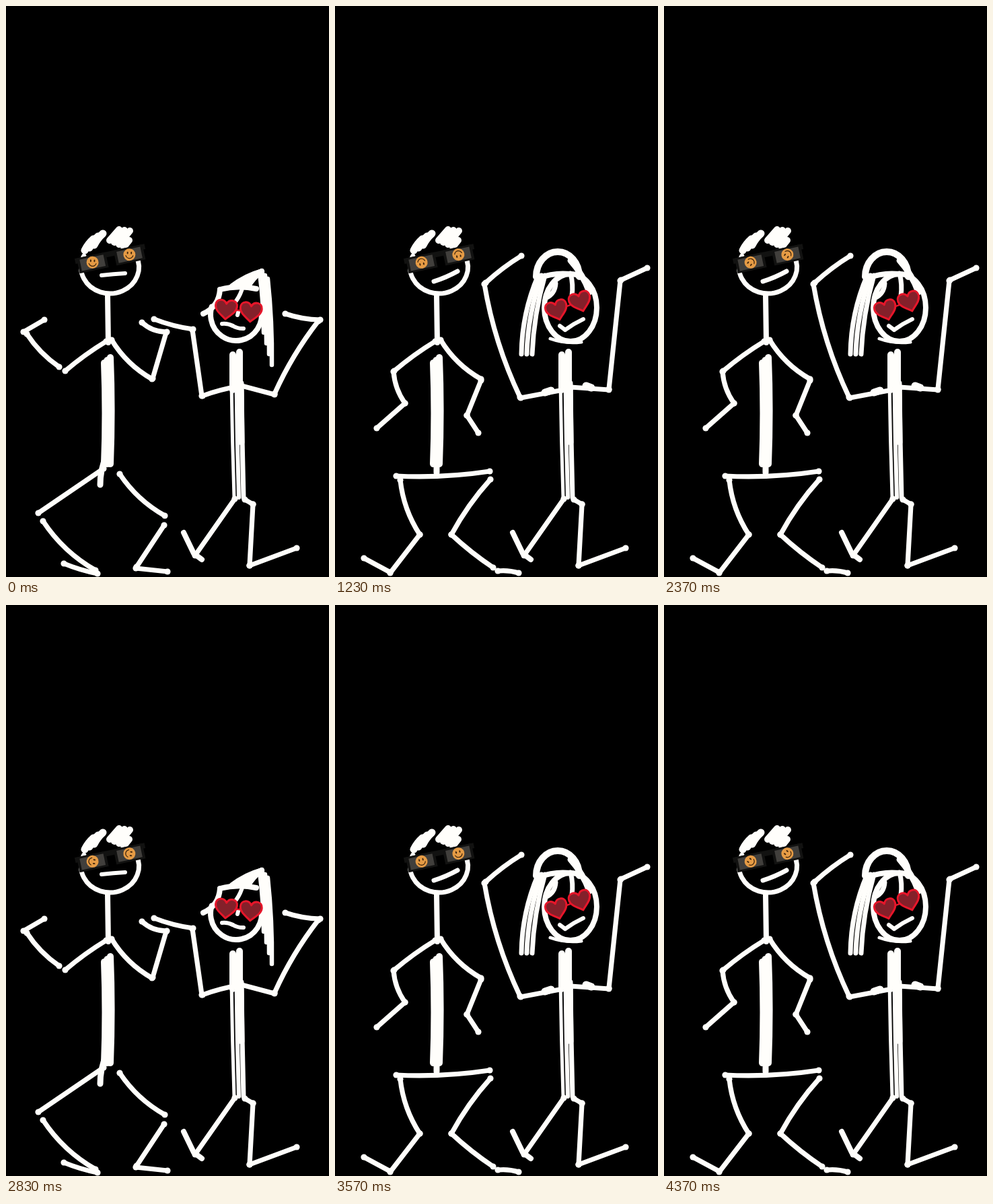
These frames come from a looping animation (480x848 px, 4410 ms). An HTML page with a canvas:

```html
<!DOCTYPE html>
<html>
<head>
<meta charset="utf-8">
<style>
  html, body { margin: 0; width: 100%; height: 100%; overflow: hidden; background: #000; }
  canvas { display: block; width: 480px; height: 848px; }
</style>
</head>
<body>
<canvas id="stage" width="480" height="848"></canvas>
<script>
const ctx = document.getElementById('stage').getContext('2d');
const LOOP = 4410, BEAT = 630, TURNS = 16;
const CHALK = '#fffefb', RED = '#e6162a', INK = '#38200a';

function disc(x, y, rx, ry = rx) {
  ctx.beginPath();
  ctx.ellipse(x, y, rx, ry, 0, 0, 7);
  ctx.fill();
}

// Chalk line through the points; every segment bows sideways by the share `bend`.
function line(width, bend, ...pts) {
  ctx.lineWidth = width;
  ctx.beginPath();
  ctx.moveTo(...pts[0]);
  for (let i = 1; i < pts.length; i++) {
    const [ax, ay] = pts[i - 1], [bx, by] = pts[i];
    ctx.quadraticCurveTo((ax + bx) / 2 - (by - ay) * bend,
      (ay + by) / 2 + (bx - ax) * bend, bx, by);
  }
  ctx.stroke();
}

// The brush presses harder at both ends of a limb.
function limb(bend, from, to) {
  line(7.2, bend, from, to);
  for (const end of [from, to]) disc(...end, 4.6);
}

function arc(width, x, y, rx, ry, from, to) {
  ctx.lineWidth = width;
  ctx.beginPath();
  ctx.ellipse(x, y, rx, ry, 0, from, to);
  ctx.stroke();
}

function repeat(count, draw) {
  for (let i = 0; i < count; i++) draw(i);
}

function at(x, y, angle, draw) {
  ctx.save();
  ctx.translate(x, y);
  ctx.rotate(angle);
  draw();
  ctx.restore();
}

function manBody() {
  arc(7, 154.5, 388, 43, 39, -0.45, Math.PI + 0.45);
  repeat(3, i => {
    line(11, -0.1, [117 + 7 * i, 363 - 4 * i], [130 + 7 * i, 346 - 4 * i]);
    line(10, 0, [154 + 7 * i, 348 + 3 * i], [168 + 8 * i, 332 + i]);
  });
  line(10, 0, [175, 358], [183, 348]);
  line(8, 0, [151, 430], [152, 500]);
  limb(0.04, [149, 498], [88, 542]);
  limb(0.13, [157, 496], [217, 554]);
  repeat(3, i => line(10, -0.02, [146 + 4.5 * i, 530 - 4 * i], [146 + 4.5 * i, 680]));
}

function womanBody() {
  repeat(2, i => line(10, 0, [337 + 10 * i, 518 - 4 * i], [337 + 10 * i, 570]));
  repeat(3, i => line(5 + i, 0.005, [335 + 7.5 * i, 560], [339 + 7 * i, 730]));
  line(9, 0, [349, 570], [350, 648]);
  limb(0, [340, 732], [281, 816]);
  line(8, 0, [264, 782], [279, 813], [291, 822]);
  limb(0, [355, 733], [367, 740]);
  limb(0, [367, 740], [362, 831]);
  limb(0, [362, 831], [432, 805]);
}

function crouch() {
  line(6, -0.02, [142, 400], [177, 397]);
  limb(-0.1, [79, 536], [31, 487]);
  limb(0, [26, 484], [57, 466]);
  limb(0, [218, 553], [238, 485]);
  limb(0.2, [202, 470], [239, 484]);
  line(9, 0.05, [156, 650], [142, 690], [140, 711]);
  limb(0, [145, 687], [48, 753]);
  limb(0.12, [55, 765], [133, 838]);
  limb(0.05, [86, 828], [136, 843]);
  limb(0.12, [169, 695], [236, 757]);
  limb(0, [235, 771], [194, 833]);
  limb(0, [193, 835], [240, 840]);
}

function squat() {
  line(7, 0.05, [147, 409], [182, 394]);
  limb(0.14, [87, 543], [104, 590]);
  limb(0, [104, 590], [62, 627]);
  limb(0, [217, 556], [196, 608]);
  limb(0, [196, 608], [213, 634]);
  line(9, 0, [151, 680], [151, 693]);
  limb(0.05, [91, 698], [230, 691]);
  limb(0.12, [97, 704], [126, 785]);
  limb(0, [126, 785], [82, 842]);
  limb(0, [43, 820], [82, 841]);
  limb(0.06, [231, 703], [173, 785]);
  limb(0.04, [173, 785], [235, 834]);
  limb(-0.1, [242, 839], [273, 842]);
}

function ponytail() {
  arc(8, 342, 458, 38, 39, -0.2, Math.PI + 0.3);
  line(8, 0.3, [293, 457], [318, 421]);
  line(8, -0.12, [318, 421], [372, 420]);
  line(6, -0.1, [352, 416], [342, 438]);
  repeat(4, i => {
    line(8, -0.1, [336 + 8 * i, 416], [380, 394]);
    line(6.5, -0.03, [377 + 4 * i, 396 + i * i], [383 + 4 * i, 485 + 16 * i]);
  });
  line(6, 0, [345, 455], [344, 459]);
  line(6, -0.15, [321, 472], [337, 475]);
  line(6, 0.15, [337, 475], [353, 479]);
  limb(0.05, [345, 565], [292, 579]);
  limb(0, [291, 579], [277, 481]);
  limb(0.06, [220, 465], [278, 480]);
  limb(0, [350, 564], [399, 577]);
  limb(-0.06, [399, 576], [464, 468]);
  limb(0.08, [415, 457], [467, 466]);
}

function looseHair() {
  arc(10, 331, 402, 32, 37, Math.PI, 2 * Math.PI);
  arc(8, 350, 448, 39, 50, 0, 7);
  line(9, -0.1, [350, 378], [378, 425]);
  line(8, -0.12, [303, 404], [350, 398]);
  repeat(3, i => line(7, 0.1 - 0.02 * i, [302 + 5 * i, 400], [277 + 8 * i, 517]));
  line(7, -0.3, [328, 412], [313, 434]);
  line(7, -0.1, [350, 397], [352, 431]);
  line(5, 0.12, [320, 494], [366, 499]);
  line(6, 0, [334, 475], [342, 481]);
  line(6, -0.05, [342, 481], [369, 465]);
  limb(0, [350, 568], [276, 582]);
  limb(-0.07, [275, 581], [222, 413]);
  limb(-0.05, [224, 411], [277, 371]);
  limb(0, [350, 566], [407, 570]);
  limb(0, [407, 569], [424, 408]);
  limb(0, [425, 407], [464, 389]);
  repeat(2, i => line(11, 0, [312 + 61 * i, 574 - 10 * i], [321 + 60 * i, 571 - 4 * i]));
}

function smiley() {
  ctx.fillStyle = '#e59b45';
  disc(0, 0, 9);
  ctx.fillStyle = ctx.strokeStyle = INK;
  for (const x of [-2.8, 2.8]) disc(x, -2.5, 1, 1.9);
  arc(1.2, 0, 0, 5.6, 5.6, 0.3, Math.PI - 0.3);
}

function shades(tilt, spin) {
  at(156, 375, tilt, () => {
    ctx.fillStyle = '#121211';
    ctx.fillRect(-53, -11, 106, 8);
    for (const side of [-1, 1]) {
      at(side * 28, 0, 0, () => {
        ctx.fillStyle = '#121211';
        ctx.fillRect(-22, -11, 44, 23);
        ctx.fillStyle = '#413f3c';
        ctx.fillRect(-18, -8, 36, 17);
        ctx.rotate(spin - tilt);
        smiley();
      });
    }
  });
}

function heart() {
  ctx.beginPath();
  ctx.moveTo(0, 15);
  for (const side of [-1, 1]) {
    ctx.moveTo(0, 15);
    ctx.bezierCurveTo(side * 6, 9, side * 16, 4, side * 16, -5);
    ctx.bezierCurveTo(side * 16, -15, side * 4, -16, 0, -8);
  }
  ctx.fill();
  ctx.lineWidth = 3;
  ctx.stroke();
}

function heartGlasses(x, y, slope, tilt) {
  ctx.strokeStyle = RED;
  ctx.fillStyle = '#84202a';
  at(x, y, slope, () => {
    line(2.5, 0, [-18, 0], [18, 0]);
    for (const side of [-1, 1]) at(side * 18.5, 0, tilt - slope, heart);
  });
}

function draw(time) {
  const t = time % LOOP;
  const low = t % BEAT < BEAT / 2;
  ctx.fillStyle = '#000';
  ctx.fillRect(0, 0, 480, 848);
  ctx.strokeStyle = ctx.fillStyle = CHALK;
  ctx.lineCap = ctx.lineJoin = 'round';
  manBody();
  womanBody();
  if (low) {
    crouch();
    ponytail();
  } else {
    squat();
    looseHair();
  }
  shades(-0.21, t / LOOP * TURNS * 2 * Math.PI);
  if (low) heartGlasses(345.5, 452, 0.1, 0.08);
  else heartGlasses(347, 445, -0.35, -0.3);
}

const start = performance.now();
function tick() {
  draw(performance.now() - start);
  requestAnimationFrame(tick);
}
tick();
</script>
</body>
</html>
```
